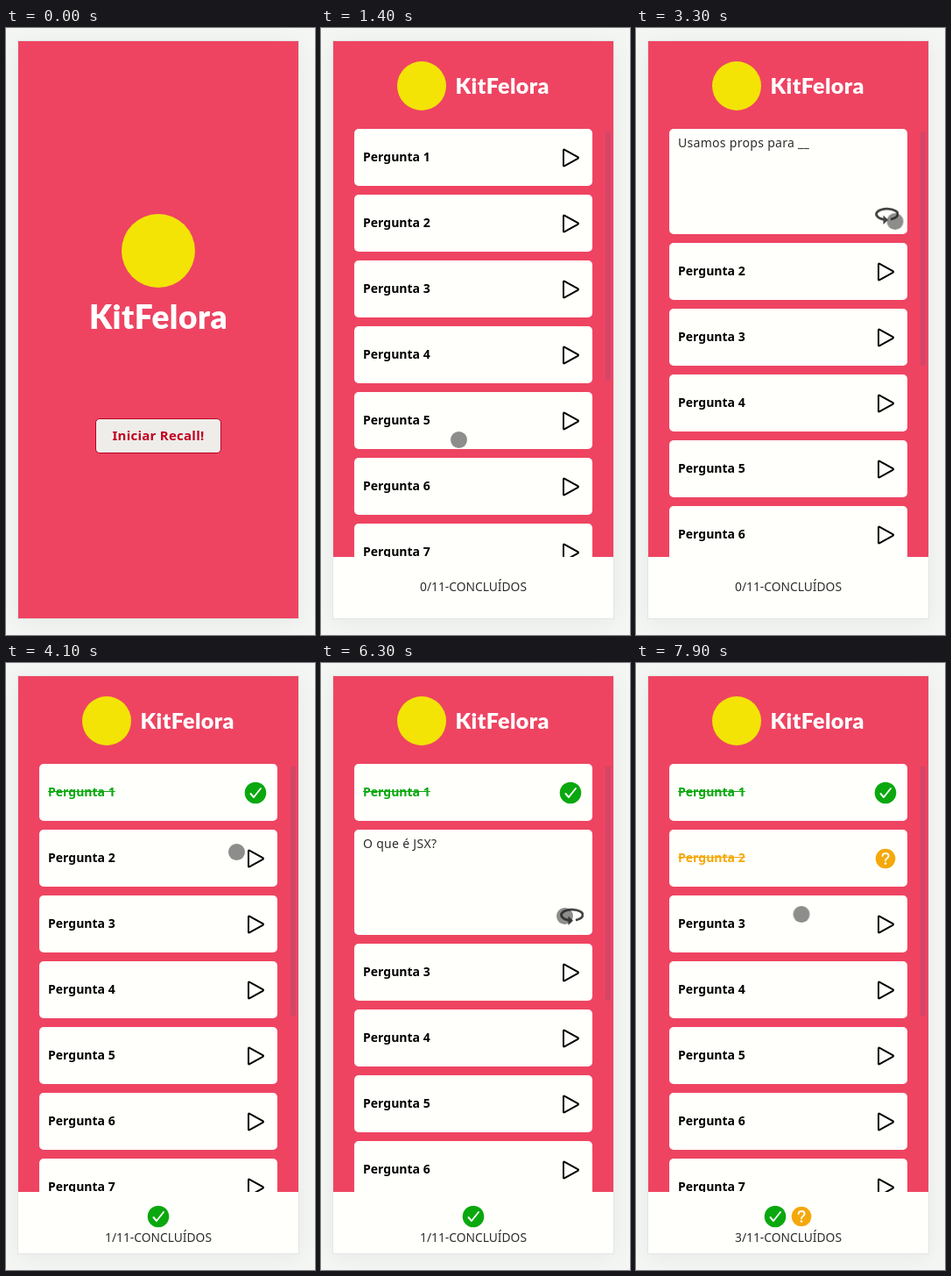
Animation of 353 by 692 pixels, one loop 8 s. Source, as an HTML page:

```html
<!DOCTYPE html>
<html lang="pt">
<head>
<meta charset="utf-8">
<title>Flashcards</title>
<style>
* { box-sizing: border-box; }
html, body { margin: 0; width: 100%; height: 100%; overflow: hidden; background: #f4f6f4; }
body { position: relative; font: 14px/20px "Noto Sans", sans-serif; color: #2c2c2c; }
svg { display: block; }

.panel {
  position: absolute; left: 14px; top: 15px; width: 320px; height: 658px;
  background: #ee4462; box-shadow: 0 0 0 1px #e3e6e4, 0 4px 24px rgba(0, 0, 0, .06);
  overflow: hidden;
}
.home { position: absolute; inset: 0; background: #ee4462; }
.logo { position: absolute; border-radius: 50%; background: #f3e406; }
.title { position: absolute; font-family: Lato, sans-serif; font-weight: 900; color: #fff; white-space: nowrap; }
.home .logo { left: 118px; top: 197px; width: 84px; height: 84px; }
.home .title { left: 0; width: 100%; top: 294px; font-size: 37px; line-height: 40px; letter-spacing: .5px; text-align: center; }
.start {
  position: absolute; left: 88px; top: 430px; width: 144px; height: 40px;
  border: 1px solid #b8001c; border-radius: 5px; background: #eeedea;
  font-size: 15px; font-weight: 700; line-height: 36px; letter-spacing: .25px;
  text-align: center; color: #c1001f;
}
.head .logo { left: 73px; top: 23px; width: 56px; height: 56px; }
.head .title { left: 139.5px; top: 35px; font-size: 25px; line-height: 30px; letter-spacing: .4px; }

.list { position: absolute; left: 24px; top: 100px; width: 272px; height: 488px; overflow: hidden; }
.card {
  position: relative; height: 65px; margin-bottom: 10px; border-radius: 5px;
  background: #fffffb; overflow: hidden;
}
.card b { position: absolute; left: 10px; top: 22px; color: #000; }
.card svg { position: absolute; left: 232px; top: 18px; }
.card .turn { top: 83px; }
.card p { position: absolute; left: 10px; top: 6px; width: 252px; margin: 0; font-weight: 500; letter-spacing: .3px; }
.yes b, .almost b { text-decoration: line-through; }
.card .yes b { color: #0aa80e; }
.card .almost b { color: #f5a80a; }
.row { position: absolute; left: 10px; top: 73px; width: 252px; display: flex; justify-content: space-between; }
.row span {
  width: 78px; height: 37px; border-radius: 5px; color: #fff; font-size: 12px; line-height: 14px;
  display: flex; align-items: center; justify-content: center; text-align: center;
}
.bar { position: absolute; left: 311px; top: 103px; width: 6px; height: 284px; background: rgba(120, 80, 120, .22); }

.foot {
  position: absolute; left: 0; top: 588px; width: 320px; height: 70px;
  background: #fffffb; font-size: 13.8px; font-weight: 500; text-align: center;
}
.foot div { position: absolute; left: 0; width: 100%; top: 24px; }
.foot .icons { top: 13px; display: flex; justify-content: center; }
.foot .low { top: 42px; }

.cursor {
  position: absolute; left: -9.5px; top: -9.5px; width: 19px; height: 19px;
  border-radius: 50%; background: rgba(40, 40, 40, .53);
}

/* Hard cuts: one percent is 80 ms */
.cut { opacity: 0; }
.cut, .card1, .card2, .bar, .cursor { animation: 8s step-end -5ms infinite; }
.home { animation-name: home; }
.card1 { animation-name: open1; }
.card2 { animation-name: open2; }
.bar { animation-name: bar; }
.closed1 { animation-name: closed1; }
.ask1 { animation-name: ask1; }
.answer1 { animation-name: answer1; }
.closed2 { animation-name: closed2; }
.ask2 { animation-name: ask2; }
.answer2 { animation-name: answer2; }
.none { animation-name: none-done; }
.first { animation-name: first-done; }
.after1 { animation-name: after1; }
.after2 { animation-name: after2; }
.cursor { animation-name: roam; }

@keyframes home { 0% { opacity: 1 } 17.5%, 100% { opacity: 0 } }
@keyframes closed1 { 0% { opacity: 1 } 33.75%, 100% { opacity: 0 } }
@keyframes ask1 { 0% { opacity: 0 } 33.75% { opacity: 1 } 42.5%, 100% { opacity: 0 } }
@keyframes answer1 { 0% { opacity: 0 } 42.5% { opacity: 1 } 51.25%, 100% { opacity: 0 } }
@keyframes after1 { 0% { opacity: 0 } 51.25%, 100% { opacity: 1 } }
@keyframes closed2 { 0% { opacity: 1 } 60%, 100% { opacity: 0 } }
@keyframes ask2 { 0% { opacity: 0 } 60% { opacity: 1 } 82.5%, 100% { opacity: 0 } }
@keyframes answer2 { 0% { opacity: 0 } 82.5% { opacity: 1 } 98.75%, 100% { opacity: 0 } }
@keyframes after2 { 0% { opacity: 0 } 98.75%, 100% { opacity: 1 } }
@keyframes none-done { 0% { opacity: 1 } 51.25%, 100% { opacity: 0 } }
@keyframes first-done { 0% { opacity: 0 } 51.25% { opacity: 1 } 98.75%, 100% { opacity: 0 } }
@keyframes open1 { 0% { height: 65px } 33.75% { height: 120px } 51.25%, 100% { height: 65px } }
@keyframes open2 { 0% { height: 65px } 60% { height: 120px } 98.75%, 100% { height: 65px } }
@keyframes bar {
  0%, 51.25% { height: 284px }
  33.75%, 60% { height: 267px }
  98.75%, 100% { height: 284px }
}

/* The pointer jumps every 100 ms while it travels */
@keyframes roam {
  0%, 6.25% { transform: translate(108px, -127px); animation-timing-function: steps(3, start) }
  10%, 11.25% { transform: translate(159px, 294px); animation-timing-function: step-start }
  12.5%, 15% { transform: translate(160px, 445px); animation-timing-function: step-start }
  16.25%, 20% { transform: translate(157px, 469px); animation-timing-function: steps(5, start) }
  26.25%, 28.75% { transform: translate(306px, 102px); animation-timing-function: step-start }
  30%, 33.75% { transform: translate(274.5px, 154px); animation-timing-function: steps(3, start) }
  37.5%, 38.75% { transform: translate(286px, 202px); animation-timing-function: step-start }
  40%, 41.25% { transform: translate(295px, 216px); animation-timing-function: step-start }
  42.5%, 46.25% { transform: translate(295.5px, 220px); animation-timing-function: step-start }
  47.5%, 48.75% { transform: translate(277px, 212px); animation-timing-function: step-start }
  50%, 51.25% { transform: translate(259px, 213px); animation-timing-function: steps(4, start) }
  56.25%, 57.5% { transform: translate(275px, 221px); animation-timing-function: step-start }
  58.75%, 61.25% { transform: translate(280.5px, 223.5px); animation-timing-function: steps(8, start) }
  71.25% { transform: translate(182px, 275px); animation-timing-function: steps(3, start) }
  75%, 77.5% { transform: translate(261px, 288px); animation-timing-function: steps(2, start) }
  80%, 82.5% { transform: translate(278px, 288px); animation-timing-function: steps(4, start) }
  87.5%, 88.75% { transform: translate(224px, 290px); animation-timing-function: step-start }
  90%, 91.25% { transform: translate(196px, 279px); animation-timing-function: step-start }
  92.5%, 100% { transform: translate(188.5px, 286px) }
}
</style>
</head>
<body>
<svg width="0" height="0" style="position:absolute">
  <symbol id="play" viewBox="-15 -15 30 30">
    <path d="M-8 -8.5Q-8 -10 -6.6 -9.2L8.4 -.8Q9.6 0 8.4 .8L-6.6 9.2Q-8 10 -8 8.5Z" fill="none" stroke="#000" stroke-width="2" stroke-linejoin="round"/>
  </symbol>
  <symbol id="check" viewBox="-15 -15 30 30">
    <circle r="12.3" fill="#0aa80e"/>
    <path d="M-5.5 1L-2 5L6 -5" fill="none" stroke="#fff" stroke-width="1.9" stroke-linecap="round" stroke-linejoin="round"/>
  </symbol>
  <symbol id="doubt" viewBox="-15 -15 30 30">
    <circle r="11.3" fill="#f5a80a"/>
    <path d="M-3.4 -3C-3.2 -7 3.6 -7 3.6 -2.9C3.6 -.4 0 -.5 0 2.3" fill="none" stroke="#fff" stroke-width="1.9" stroke-linecap="round"/>
    <circle cy="5.6" r="1.3" fill="#fff"/>
  </symbol>
  <symbol id="turn" viewBox="-15 -15 30 30">
    <path d="M-1 5.3A12.2 6.2 0 1 1 6 5.1" fill="none" stroke="#444" stroke-width="2.8"/>
    <path d="M-2.5 .5L3 5.8L-2.5 11Z" fill="#444"/>
  </symbol>
</svg>

<div class="panel">
  <div class="head"><div class="logo"></div><div class="title">KitFelora</div></div>
  <div class="list">
    <div class="card card1">
      <div class="cut closed1"><b>Pergunta 1</b><svg width="30" height="30"><use href="#play"/></svg></div>
      <div class="cut ask1"><p>Usamos props para __</p><svg class="turn" width="30" height="30"><use href="#turn"/></svg></div>
      <div class="cut answer1">
        <p>Passar diferentes informações para componentes</p>
        <div class="row"><span style="background:#f33">Não lembrei</span><span style="background:#f5a80a">Quase não lembrei</span><span style="background:#0aa80e">Lembrei!</span></div>
      </div>
      <div class="cut after1 yes"><b>Pergunta 1</b><svg width="30" height="30"><use href="#check"/></svg></div>
    </div>
    <div class="card card2">
      <div class="cut closed2"><b>Pergunta 2</b><svg width="30" height="30"><use href="#play"/></svg></div>
      <div class="cut ask2"><p>O que é JSX?</p><svg class="turn" width="30" height="30"><use href="#turn"/></svg></div>
      <div class="cut answer2">
        <p>Uma extensão de linguagem do JavaScript</p>
        <div class="row"><span style="background:#f33">Não lembrei</span><span style="background:#f5a80a">Quase não lembrei</span><span style="background:#0aa80e">Lembrei!</span></div>
      </div>
      <div class="cut after2 almost"><b>Pergunta 2</b><svg width="30" height="30"><use href="#doubt"/></svg></div>
    </div>
    <div class="card"><b>Pergunta 3</b><svg width="30" height="30"><use href="#play"/></svg></div>
    <div class="card"><b>Pergunta 4</b><svg width="30" height="30"><use href="#play"/></svg></div>
    <div class="card"><b>Pergunta 5</b><svg width="30" height="30"><use href="#play"/></svg></div>
    <div class="card"><b>Pergunta 6</b><svg width="30" height="30"><use href="#play"/></svg></div>
    <div class="card"><b>Pergunta 7</b><svg width="30" height="30"><use href="#play"/></svg></div>
  </div>
  <div class="bar"></div>
  <div class="foot">
    <div class="cut none">0/11-CONCLUÍDOS</div>
    <div class="cut first icons"><svg width="30" height="30"><use href="#check"/></svg></div>
    <div class="cut first low">1/11-CONCLUÍDOS</div>
    <div class="cut after2 icons"><svg width="30" height="30"><use href="#check"/></svg><svg width="30" height="30"><use href="#doubt"/></svg></div>
    <div class="cut after2 low">3/11-CONCLUÍDOS</div>
  </div>
  <div class="cut home">
    <div class="logo"></div>
    <div class="title">KitFelora</div>
    <div class="start">Iniciar Recall!</div>
  </div>
</div>
<div class="cursor"></div>
</body>
</html>
```
